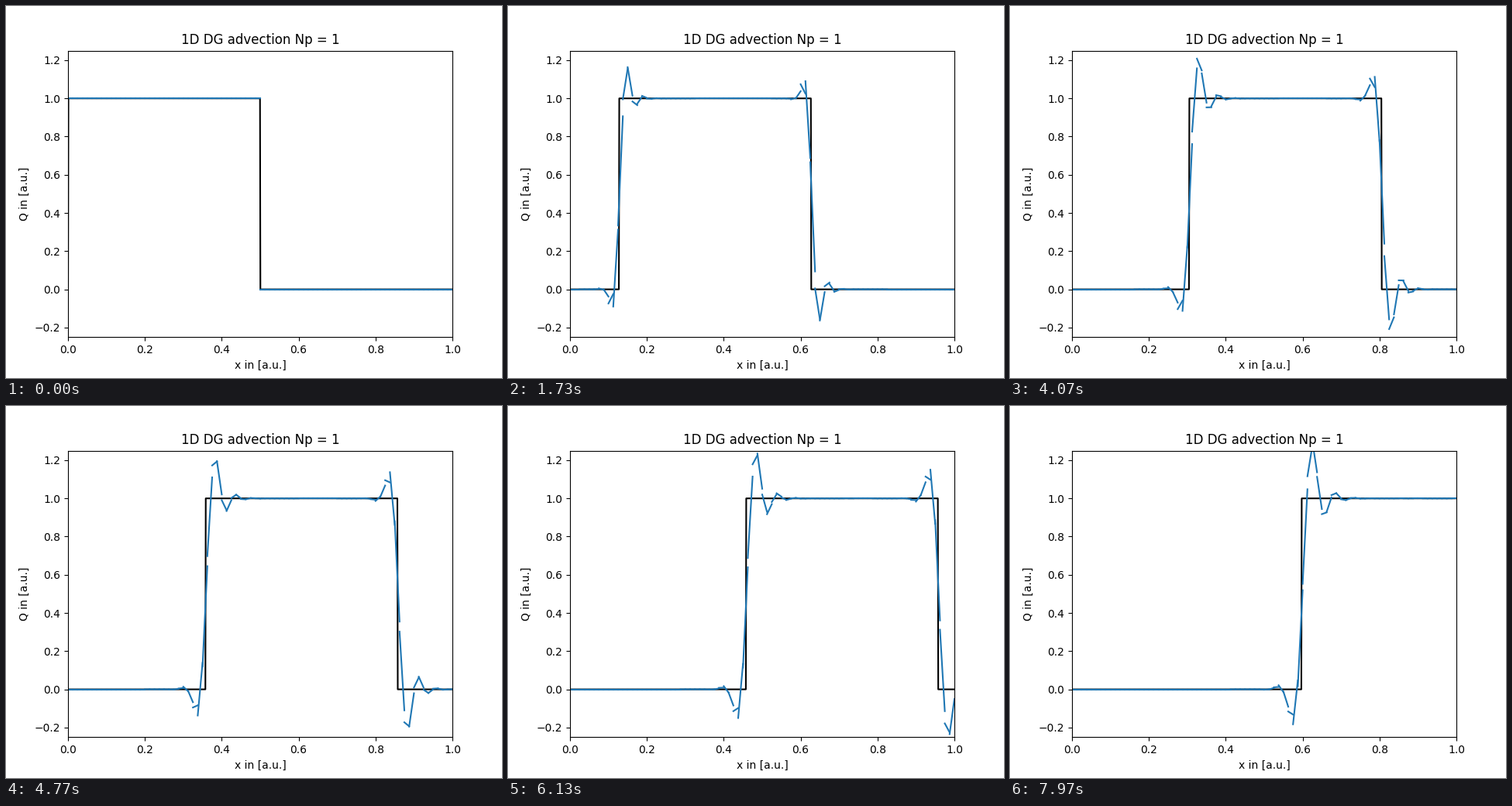
A matplotlib script for the animation above (8000 ms loop, 640 px wide and 480 px high).

```python
import numpy as np
import matplotlib.pyplot as plt
from matplotlib.animation import FuncAnimation

CELLS = 80
FRAMES = 240
SUBSTEPS = 5
DT = 0.0005
H = 1 / CELLS

edges = np.linspace(0, 1, CELLS + 1)
grid = np.linspace(0, 1, 1000)


def euler_step(mean, slope):
    """Linear elements, upwind flux, zero inflow, unit speed."""
    right = mean + slope
    inflow = np.concatenate(([0.0], right[:-1]))
    new_mean = mean - DT / H * (right - inflow)
    new_slope = slope + 3 * DT / H * (2 * mean - right - inflow)
    return new_mean, new_slope


def solve():
    mean = np.where(edges[:-1] < 0.5 - H / 2, 1.0, 0.0)
    slope = np.zeros(CELLS)
    states = []
    for _ in range(FRAMES):
        states.append(np.column_stack([mean - slope, mean + slope]))
        for _ in range(SUBSTEPS):
            mean, slope = euler_step(mean, slope)
    return states


def exact(t):
    return np.where((grid > t) & (grid <= 0.5 + t), 1.0, 0.0)


states = solve()

fig, ax = plt.subplots(figsize=(6.4, 4.8), dpi=100)
ax.set_xlim(0, 1)
ax.set_ylim(-0.25, 1.25)
ax.set_title("1D DG advection Np = 1")
ax.set_xlabel("x in [a.u.]")
ax.set_ylabel("Q in [a.u.]")

exact_line, = ax.plot(grid, exact(0), color="black")
cell_lines = [
    ax.plot(edges[i:i + 2], states[0][i], color="C0")[0] for i in range(CELLS)
]


def update(frame):
    exact_line.set_ydata(exact(frame * SUBSTEPS * DT))
    for line, values in zip(cell_lines, states[frame]):
        line.set_ydata(values)
    return [exact_line, *cell_lines]


anim = FuncAnimation(fig, update, frames=FRAMES, init_func=lambda: update(0),
                     interval=8000 / FRAMES, repeat=True, repeat_delay=0)
plt.show()
```
